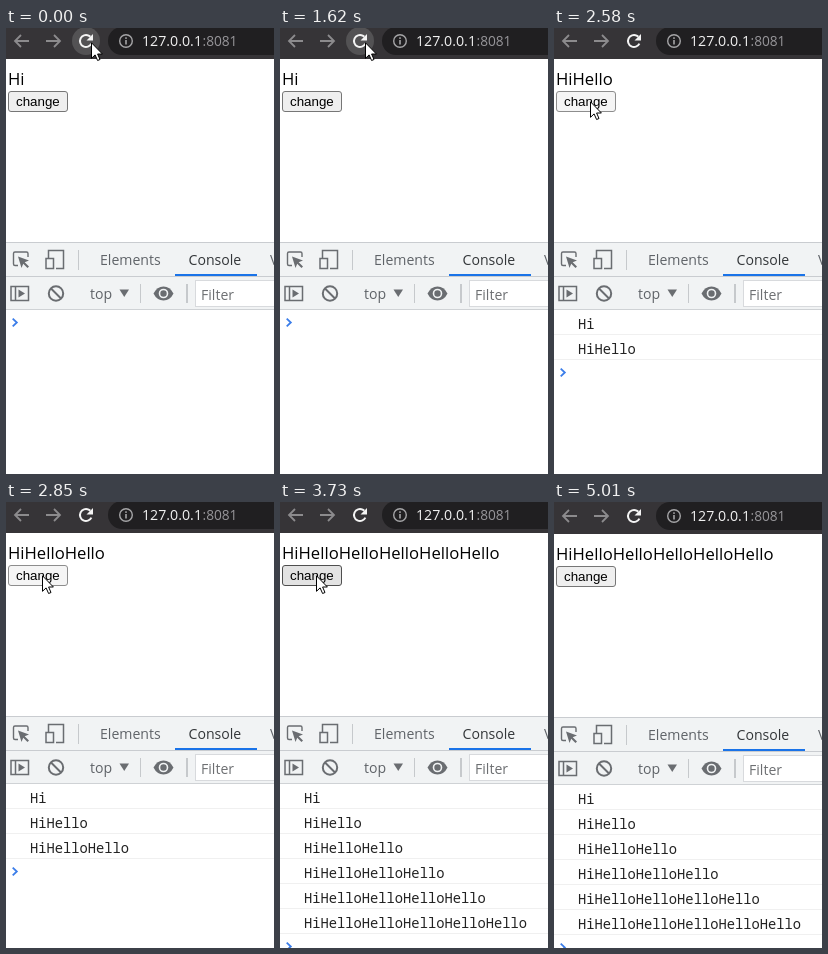
An HTML page with a canvas that plays this animation: 268x446 px, repeating every 5270 ms.

```html
<!DOCTYPE html>
<html lang="en">
<head>
<meta charset="utf-8">
<title>Console demo</title>
<style>
html, body { margin: 0; width: 100%; height: 100%; overflow: hidden; background: #fff; }
canvas { display: block; width: 268px; height: 446px; }
</style>
</head>
<body>
<canvas id="stage"></canvas>
<script>
const W = 268, H = 446, LOOP = 5270;
const canvas = document.getElementById('stage');
const ctx = canvas.getContext('2d', { alpha: false });
const dpr = window.devicePixelRatio || 1;
canvas.width = W * dpr;
canvas.height = H * dpr;

const UI = '"Open Sans", "Noto Sans", sans-serif';
const MONO = '"Noto Sans Mono", "DejaVu Sans Mono", monospace';
const ARIAL = '"Liberation Sans", Arial, sans-serif';

// Each track lists [start in ms, value]; values hold until the next start.
const logs = [[0, 0], [130, 1], [420, 0], [850, 1], [970, 0], [1090, 1], [1210, 0],
  [1330, 1], [1620, 0], [1740, 1], [2430, 2], [2730, 3], [3000, 4], [3430, 5], [3730, 6]];
const hellos = [[0, 0], [2280, 1], [2730, 2], [3000, 3], [3430, 4], [3730, 5]];
const button = [[0, 'idle'], [2010, 'hover'], [2580, 'active'], [2730, 'hover'],
  [2850, 'active'], [3000, 'hover'], [3280, 'active'], [3430, 'hover'],
  [3580, 'active'], [3730, 'hover'], [4290, 'idle']];
const cursor = [[0, [85, 14]], [1890, [62, 48]], [2010, [44, 68]], [2160, [38, 72]],
  [2280, [36, 73]], [4290, [130, 247]], [4410, [225, 421]], [4560, null]];
const halo = [[0, '#535254'], [1890, '#434245'], [2160, null]];
const shift = [[0, 0], [5010, 1]];

const faces = {
  idle: ['#efefef', '#767676'],
  hover: ['#e3e3e3', '#4f4f4f'],
  active: ['#f5f5f5', '#8d8d8d']
};

function at(track, t) {
  let value = track[0][1];
  for (const [start, v] of track) if (t >= start) value = v;
  return value;
}

function box(x, y, w, h, color) {
  ctx.fillStyle = color;
  ctx.fillRect(x, y, w, h);
}

function text(str, x, y, size, color, family = UI, weight = 400) {
  ctx.font = `${weight} ${size}px ${family}`;
  ctx.fillStyle = color;
  ctx.fillText(str, x, y);
}

function line(d, color, width = 1) {
  ctx.strokeStyle = color;
  ctx.lineWidth = width;
  ctx.stroke(new Path2D(d));
}

function shape(d, color) {
  ctx.fillStyle = color;
  ctx.fill(new Path2D(d));
}

function disc(x, y, r, color) {
  ctx.fillStyle = color;
  ctx.beginPath();
  ctx.arc(x, y, r, 0, Math.PI * 2);
  ctx.fill();
}

function ring(x, y, r, color, width, from = 0, to = Math.PI * 2) {
  ctx.strokeStyle = color;
  ctx.lineWidth = width;
  ctx.beginPath();
  ctx.arc(x, y, r, from, to);
  ctx.stroke();
}

function drawBrowserBar(t) {
  box(0, -1, W, 32, '#363437');
  line('M23 13H9.5M15 7L9 13L15 19', '#8c8b8d', 1.8);
  line('M40 13H53.5M48 7L54 13L48 19', '#8c8b8d', 1.8);

  const glow = at(halo, t);
  if (glow) disc(80, 13, 14, glow);
  ring(80, 13, 6, '#f4f4f4', 2, 0.45, 5.5);
  shape('M87 6V12.5H80.5Z', '#f4f4f4');

  ctx.fillStyle = '#201f21';
  ctx.beginPath();
  ctx.roundRect(102, -1, 200, 28, 14);
  ctx.fill();
  ring(120, 13, 6.3, '#a5a5a7', 1.4);
  box(119.2, 12, 1.6, 4.5, '#a5a5a7');
  box(119.2, 9.3, 1.6, 1.6, '#a5a5a7');
  text('127.0.0.1', 136, 18, 14.2, '#f1f1f1', UI, 500);
  text(':8081', 196.5, 18, 13.7, '#97969a');
}

function drawPage(t) {
  text('Hi' + 'Hello'.repeat(at(hellos, t)), 2, 56.5, 16.7, '#000');
  const [fill, edge] = faces[at(button, t)];
  ctx.beginPath();
  ctx.roundRect(2.5, 63.5, 59, 20, 2.5);
  ctx.fillStyle = fill;
  ctx.fill();
  ctx.strokeStyle = edge;
  ctx.lineWidth = 1;
  ctx.stroke();
  text('change', 10, 78, 13.33, '#000', ARIAL);
}

function drawTabs() {
  const ink = '#6a6d71';
  box(0, 214, W, 68, '#f1f3f4');
  box(0, 214, W, 1, '#c9ccd0');
  box(0, 248, W, 1, '#c9ccd0');
  box(0, 281, W, 1, '#cfd2d5');

  // element picker
  line('M12 237.5H9Q7.5 237.5 7.5 236V225.5Q7.5 224 9 224H20.5Q22 224 22 225.5V229', ink, 1.4);
  shape('M12 228.5L23 232.5L18.7 234.2L23 238.5L21.5 240L17.2 235.7L15.5 240Z', ink);

  // device toggle
  line('M42.5 230V222.5H57.5V240.5H50', ink, 1.5);
  line('M40 230.5H47.5V240.5H40Z', ink, 1.5);
  box(72, 222, 1, 20, '#c6c9cc');

  text('Elements', 94, 237, 14.1, '#5f6368');
  text('Console', 182.5, 237, 14.1, '#333639');
  text('V', 264, 237, 14.1, '#5f6368');
  box(169, 246, 82, 2, '#1a73e8');
}

function drawTools() {
  const ink = '#6a6d71';
  line('M5 258.5H22.5V272.5H5ZM9.5 258.5V272.5', ink, 1.5);
  shape('M12.5 261.5L19 265.5L12.5 269.5Z', ink);
  ring(50, 265.5, 7.2, ink, 2);
  line('M45 260.5L55 270.5', ink, 2);

  text('top', 84, 271, 14.1, '#5f6368');
  shape('M113.5 261.5H123L118.25 269Z', ink);
  box(134, 256, 1, 19, '#c6c9cc');

  shape('M147.5 265.5Q151 258.5 157.5 258.5T167.5 265.5Q164 272.5 157.5 272.5T147.5 265.5Z', ink);
  ring(157.5, 265.5, 4, '#f1f3f4', 1.6);
  box(180, 256, 2, 19, '#c6c9cc');

  box(189, 252, W, 27, '#d8dadd');
  box(190, 253, W, 25, '#fff');
  text('Filter', 195, 271.5, 14.1, '#6d6f72');
}

function drawConsole(t) {
  const count = at(logs, t);
  for (let i = 0; i < count; i++) {
    const y = 25 * i;
    text('Hi' + 'Hello'.repeat(i), 24, y + 301, 13.77, '#222', MONO);
    box(0, y + 306, W, 1, '#f0f0f0');
  }
  const y = 294.5 + 25 * count;
  line(`M6.7 ${y - 3.8}L10.8 ${y}L6.7 ${y + 3.8}`, '#3b7de9', 1.8);
}

function drawCursor(t) {
  const tip = at(cursor, t);
  if (!tip) return;
  ctx.save();
  ctx.translate(tip[0], tip[1]);
  const arrow = 'M.5 .8V16.3L4.1 12.9L6.6 18.5L9 17.5L6.6 12H11.4Z';
  shape(arrow, '#fff');
  line(arrow, '#000');
  ctx.restore();
}

function draw(t) {
  ctx.setTransform(dpr, 0, 0, dpr, 0, 0);
  box(0, 0, W, H, '#fff');
  ctx.translate(0, at(shift, t));
  drawBrowserBar(t);
  drawPage(t);
  drawTabs();
  drawTools();
  drawConsole(t);
  drawCursor(t);
}

const begin = performance.now();
function tick() {
  draw((performance.now() - begin) % LOOP);
  requestAnimationFrame(tick);
}
tick();
</script>
</body>
</html>
```
